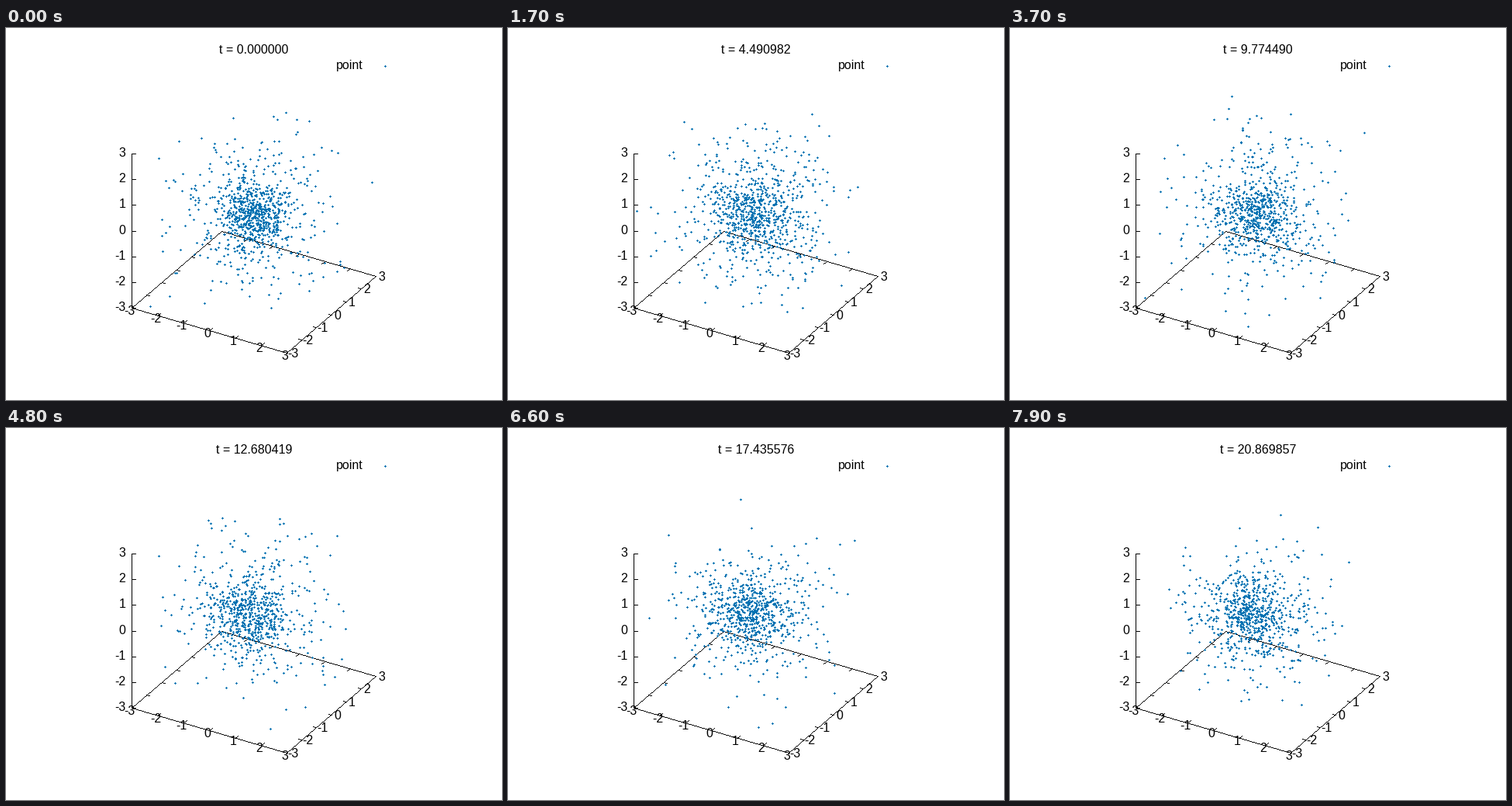
A matplotlib script that plays this animation: 640 by 480 pixels, repeating every 8 s.

```python
import matplotlib.pyplot as plt
import numpy as np
from matplotlib.animation import FuncAnimation
from matplotlib.path import Path

W, H, DPI = 640, 480, 100
FRAMES, DT, SUB = 80, 0.2641754, 12
N, LIM = 1000, 3
PX = 72 / DPI                      # one pixel in points
BLUE = "#0072b2"

CENTER = np.array([319.75, 241.0])
AXES = np.array([[33.4, 9.65], [19.2, -16.5], [0, -33.15]])
DRIFT = np.array([-0.0085, -0.005, 0])

plt.rcParams["font.family"] = "Liberation Sans"
rng = np.random.default_rng(12)


def project(p):
    return CENTER + p @ AXES


def directions(n):
    v = rng.normal(size=(n, 3))
    return v / np.linalg.norm(v, axis=1, keepdims=True)


def plummer(n):
    """Positions and velocities of a Plummer sphere with unit mass and radius."""
    r = (rng.uniform(0.001, 0.985, n) ** (-2 / 3) - 1) ** -0.5
    speed = np.sqrt(2 * rng.beta(1.5, 4.5, n)) * (1 + r * r) ** -0.25
    return r[:, None] * directions(n), speed[:, None] * directions(n)


def pull(p):
    # Weaker than equilibrium, so the cluster slowly spreads
    return -0.7 * p / (1 + (p * p).sum(1, keepdims=True)) ** 1.5


def simulate():
    pos, vel = plummer(N)
    h = DT / SUB
    states = []
    for k in range(FRAMES):
        states.append(pos + DRIFT * k * DT)
        for _ in range(SUB):
            vel = vel + pull(pos) * h / 2
            pos = pos + vel * h
            vel = vel + pull(pos) * h / 2
    return states


def pixels(p):
    inside = (np.abs(p) <= LIM).all(axis=1)
    return np.floor(project(p[inside])).astype(int)


fig = plt.figure(figsize=(W / DPI, H / DPI), dpi=DPI, facecolor="white")
ax = fig.add_axes([0, 0, 1, 1])
ax.set(xlim=(0, W), ylim=(H, 0))
ax.axis("off")


def label(x, y, s, ha="center"):
    return ax.text(x, y, s, ha=ha, va="baseline", fontsize=16 * PX,
                   color="black", zorder=4)


# Marker shapes laid on the pixel grid
PLUS = Path(np.array([(0, -2), (1, -2), (1, -1), (2, -1), (2, 0), (1, 0), (1, 1),
                      (0, 1), (0, 0), (-1, 0), (-1, -1), (0, -1), (0, -2)], float),
            closed=True)
PIXEL = Path(np.array([(0, -1), (1, -1), (1, 0), (0, 0), (0, -1)], float),
             closed=True)


def stamp(xy, shape, color, z):
    size = 2 * np.abs(shape.vertices).max() * PX
    return ax.plot(*np.transpose(xy), ls="none", marker=shape, ms=size, mew=0,
                   mfc=color, antialiased=False, snap=True, zorder=z)[0]


def line(p, q):
    """Thin line of single pixels from p to q."""
    p, q = np.round(p), np.round(q)
    n = int(np.abs(q - p).max()) + 1
    stamp(np.floor(np.linspace(p, q, n) + 0.5), PIXEL, "black", 1)


def tick(p, d):
    line(p, np.round(p) + d)


# Box edges
A, B, C, D, TOP = (162, 361), (362, 419), (477, 320), (278, 262), (162, 162)
for p, q in [(A, B), (B, C), (C, D), (D, A), (A, TOP)]:
    line(p, q)


def between(p, q, f):
    return np.array(p) + f * (np.array(q) - p)


for v in range(-LIM, LIM + 1):
    f = (v + LIM) / (2 * LIM)
    px, py, pz = between(A, B, f), between(B, C, f), between(A, TOP, f)
    tick(pz, (5, 0))
    if abs(v) < LIM:
        tick(px, (4, -3))
        tick(between(D, C, f), (-4, 3))
        tick(py, (-4, -1))
        tick(between(A, D, f), (4, 1))
    label(px[0] - 2.5, px[1] + 9, str(v))
    label(py[0] + 8, py[1] + 6, str(v))
    label(154.5, pz[1] + 4, str(v), "right")

stamp([(489, 49)], PLUS, BLUE, 3)
label(461, 53, "point", "right")
title = label(319.75, 33, "")

states = simulate()
cloud = stamp(pixels(states[0]), PLUS, BLUE, 3)


def draw(i):
    cloud.set_data(*pixels(states[i]).T)
    title.set_text(f"t = {i * DT:.6f}")
    return cloud, title


anim = FuncAnimation(fig, draw, frames=FRAMES, interval=100, repeat=True,
                     repeat_delay=0, blit=False)
plt.show()
```
